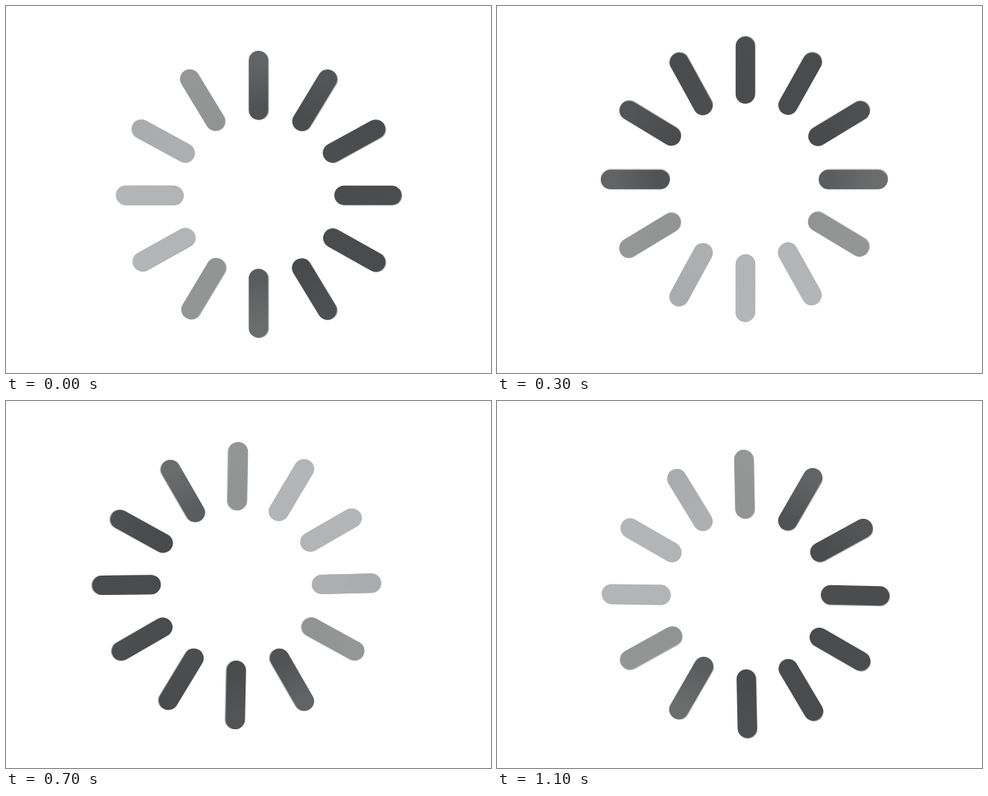
Write an HTML page with a canvas that moves like this. It is 650 px wide and 492 px high and loops after 1.2 s.

```html
<!DOCTYPE html>
<html lang="en">
<head>
<meta charset="utf-8">
<title>Loading spinner</title>
<style>
  html, body { margin: 0; width: 100%; height: 100%; overflow: hidden; background: #fff; }
  canvas { display: block; }
</style>
</head>
<body>
<canvas id="stage" width="650" height="492"></canvas>
<script>
const ctx = document.getElementById('stage').getContext('2d');
const STEPS = 12, STEP_MS = 100;
const PIVOT = { x: 325, y: 246 };
const WIDTH = 26;
const RAD = Math.PI / 180;

// Slightly uneven bars, clockwise from the top:
// centre x, centre y, extra tilt in degrees, length, outer colour, inner colour
const bars = [
  [338.3, 106.3, 0, 92.5, '#616365', '#505254'],
  [413.7, 126.3, 1.2, 92, '#535455', '#4b4c4d'],
  [466.5, 181.1, 1.2, 92, '#4a4b4c', '#4c4d4e'],
  [485, 253.8, 0, 90, '#4c4d4e', '#4a4b4c'],
  [466.8, 327.2, -0.7, 92, '#4a4b4c', '#4a4b4c'],
  [413.3, 379.4, -1.2, 92, '#4e4f50', '#494a4b'],
  [338.3, 398.4, 0, 92.5, '#6b6d6d', '#5a5c5e'],
  [264.7, 378.8, 1, 91.5, '#949695', '#929494'],
  [211.3, 326.5, 0.8, 92, '#b4b5b7', '#b3b4b6'],
  [192.1, 253.6, 0, 90, '#b4b5b7', '#b3b4b6'],
  [210.2, 180.8, -1.4, 92, '#aaabad', '#aeafb1'],
  [263.2, 126, -1.2, 92, '#959796', '#929494'],
];

function capsule(half, dx, dy, color) {
  ctx.strokeStyle = color;
  ctx.beginPath();
  ctx.moveTo(dx, dy - half);
  ctx.lineTo(dx, dy + half);
  ctx.stroke();
}

function drawBar([x, y, tilt, length, outer, inner], i) {
  const angle = (i * 30 + tilt) * RAD;
  const half = (length - WIDTH) / 2;
  const fill = ctx.createLinearGradient(0, -length / 2, 0, length / 2);
  fill.addColorStop(0.2, outer);
  fill.addColorStop(0.8, inner);

  ctx.save();
  ctx.translate(x, y);
  ctx.rotate(angle);
  // The pale rim lies on one fixed side of the whole ring.
  const dx = 1.1, dy = 0.6, c = Math.cos(angle), s = Math.sin(angle);
  capsule(half, dx * c + dy * s, dy * c - dx * s, '#aeada9');
  capsule(half, 0, 0, fill);
  ctx.restore();
}

function frame() {
  const step = Math.floor(performance.now() / STEP_MS) % STEPS;
  ctx.fillStyle = '#fff';
  ctx.fillRect(0, 0, 650, 492);
  ctx.lineCap = 'round';
  ctx.lineWidth = WIDTH;
  ctx.save();
  ctx.translate(PIVOT.x, PIVOT.y);
  ctx.rotate(-step * 30 * RAD);
  ctx.translate(-PIVOT.x, -PIVOT.y);
  bars.forEach(drawBar);
  ctx.restore();
  requestAnimationFrame(frame);
}
frame();
</script>
</body>
</html>
```
